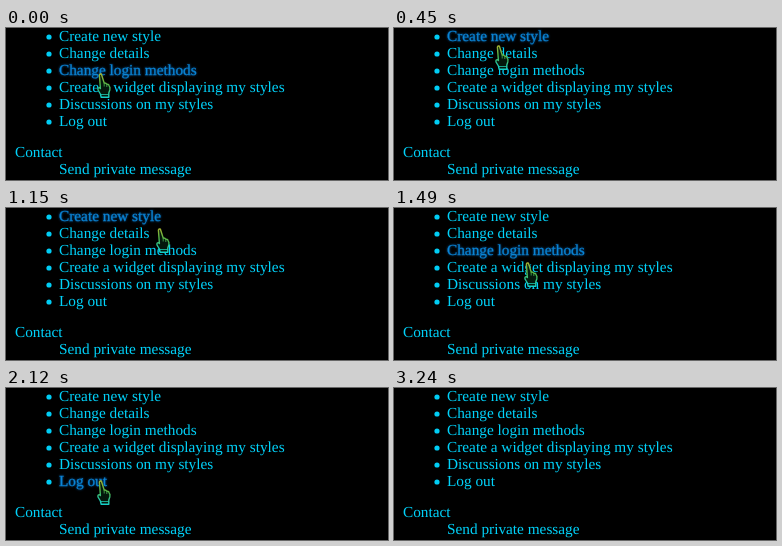
Write an HTML page that moves like this. It is 382 by 152 pixels and loops after 3.67 s.

```html
<!DOCTYPE html>
<html lang="en">
<meta charset="utf-8">
<title>Menu hover</title>
<style>
  html, body { margin: 0; height: 100%; overflow: hidden; background: #000; }
  svg { display: block; width: 382px; height: 152px; }
  text {
    font: 15.3px "Liberation Serif", "Times New Roman", serif;
    text-rendering: geometricPrecision;
    fill: #00d2fa;
  }
  circle { fill: #00cdf5; }
  .hover {
    fill: #0a86d6; stroke: #0a78c4; stroke-width: .3px;
    filter: drop-shadow(0 0 1.3px #05508f);
  }
  #hand, #arrow { stroke: url(#tint); stroke-width: 1.4; stroke-linejoin: round; }
</style>
<svg viewBox="0 0 382 152">
  <defs>
    <linearGradient id="tint" gradientUnits="userSpaceOnUse" x1="5" y1="2" x2="0" y2="23">
      <stop offset="0" stop-color="#a3b030"/>
      <stop offset=".45" stop-color="#4fb54a"/>
      <stop offset="1" stop-color="#14cfc8"/>
    </linearGradient>
  </defs>
  <g id="menu"></g>
  <text x="9" y="129">Contact</text>
  <text x="53" y="146">Send private message</text>
  <g id="hand" fill="#04180c">
    <path d="M-1.6 2Q-.8 .4 .4 1.2L3.2 10Q5 9.6 5.8 11.2Q8 11 8.2 13Q9.4 14 8.8 17L7.8 20V24.3H.2L-.6 21L-3 17Q-3.4 14.5-1.6 14.6L-.6 15.5Z"/>
    <path d="M3.2 10V13.5M5.8 11.4V14M0 21.5H8" fill="none" stroke-width=".8"/>
  </g>
  <path id="arrow" fill="#000" d="M.7 .9L1.2 20L5 16.7L7.6 23.4L10.4 22.2L7.8 15.8L12.6 15.2Z"/>
</svg>
<script>
  const LOOP = 3670, STEP = 111.5, STEPS = 29, ROW = 17, LEFT = 53;
  const labels = ["Create new style", "Change details", "Change login methods",
    "Create a widget displaying my styles", "Discussions on my styles", "Log out"];

  // Turning points of the pointer path: step, x, y
  const path = [[0, 95, 45], [4, 105, 17], [7, 123, 9], [10, 154, 20], [13, 134, 54],
    [16, 104, 76], [19, 95, 92], [24, 182, 103], [28, 290, 136]];

  const find = id => document.getElementById(id);
  const menu = find("menu"), hand = find("hand"), arrow = find("arrow");
  menu.innerHTML = labels.map((label, i) =>
    `<circle cx="43" cy="${9 + ROW * i}" r="2.6"/>` +
    `<text x="${LEFT}" y="${13 + ROW * i}">${label}</text>`).join("");
  const rows = [...menu.querySelectorAll("text")];

  function slope(i, axis) {
    const a = path[Math.max(i - 1, 0)], b = path[Math.min(i + 1, path.length - 1)];
    return (b[axis] - a[axis]) / (b[0] - a[0]);
  }

  // Smooth cubic curve through the turning points
  function pointAt(step, axis) {
    const i = Math.max(0, path.findIndex(key => key[0] >= step) - 1);
    const a = path[i], b = path[i + 1], span = b[0] - a[0];
    const u = (step - a[0]) / span, v = 1 - u;
    return v * v * (1 + 2 * u) * a[axis] + u * u * (3 - 2 * u) * b[axis] +
      span * u * v * (v * slope(i, axis) - u * slope(i + 1, axis));
  }

  function place(pointer, x, y, visible) {
    pointer.setAttribute("transform", `translate(${Math.round(x)} ${Math.round(y)})`);
    pointer.style.display = visible ? "" : "none";
  }

  function draw() {
    const step = Math.floor(performance.now() % LOOP / STEP);
    const shown = step < STEPS, pose = Math.min(step, STEPS - 1);
    const x = pointAt(pose, 1), y = pointAt(pose, 2);
    const row = rows[Math.floor((y - 4) / ROW)];
    const over = shown && row && x < LEFT + row.getComputedTextLength() + 8;
    rows.forEach(text => text.classList.toggle("hover", over && text === row));
    place(hand, x, y, over);
    place(arrow, x, y, shown && !over);
    requestAnimationFrame(draw);
  }
  draw();
</script>
</html>
```
